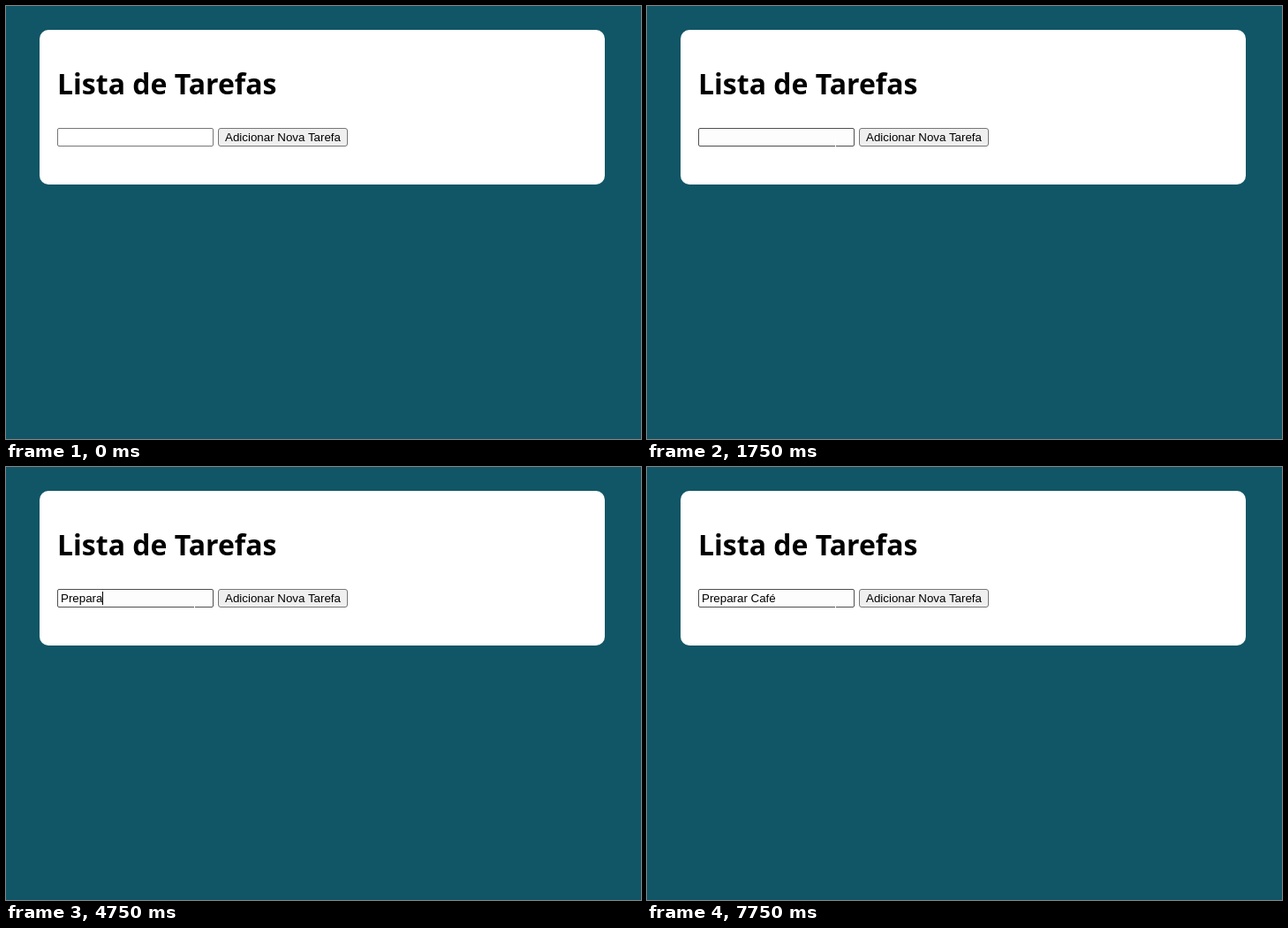
Write an HTML page that moves like this. It is 719 px wide and 490 px high and loops after 8 s.

```html
<!DOCTYPE html>
<html lang="pt-BR">
<head>
<meta charset="utf-8">
<title>Lista de Tarefas</title>
<style>
  html, body { margin: 0; width: 100%; height: 100%; overflow: hidden; background: rgb(17, 86, 102); }
  body * { position: absolute; box-sizing: border-box; margin: 0; white-space: pre; }
  .card { left: 38px; top: 27px; width: 640px; height: 175px; border-radius: 10px; background: #fff; }
  h1 { left: 58px; top: 66px; font: 700 32px/44px "Open Sans", sans-serif; color: #000; }
  .field, .button {
    top: 138px; height: 21px; border: 1px solid #767676; border-radius: 2px;
    font: 13.3333px/15px "Liberation Sans", Arial, sans-serif; color: #000;
  }
  .field { left: 58px; width: 177px; background: #fff; }
  .field.hover { border-color: #4f4f4f; background: #fdfdfd; }
  .field.pressed { border-color: #858585; }
  .text { left: 3px; top: 2px; }
  .caret { top: 2px; width: 1px; height: 15px; background: #000; }
  .button { left: 240px; width: 147px; border-radius: 3px; background: #efefef; text-align: center; padding-top: 2px; }
  .beam { left: 213px; top: 150px; width: 1px; height: 10px; background: #fff; }
  .arrow { left: 0; top: 0; width: 12px; height: 19px; overflow: visible; }
</style>
</head>
<body>
<div class="card"></div>
<h1>Lista de Tarefas</h1>
<div class="field"><span class="text"></span><i class="caret"></i></div>
<div class="button">Adicionar Nova Tarefa</div>
<div class="beam"></div>
<svg class="arrow" viewBox="0 0 12 19">
  <path d="M.5 .5V16.5L4.2 13L6.6 18.5L9 17.5L6.7 12H11.5Z" fill="#fff" stroke="#000"/>
</svg>
<script>
  const LOOP = 8000;
  const PHRASE = "Preparar Café";
  // Time at which each letter of the phrase appears
  const KEYS = [3000, 3500, 3750, 4000, 4250, 4500, 4750, 5000, 5500, 6000, 6250, 6750, 7250];
  const FOCUS = 1250;
  const BLINK = 500;

  const [field, text, caret, beam, arrow] =
    ["field", "text", "caret", "beam", "arrow"].map(name => document.querySelector("." + name));
  const show = (el, on) => { el.style.visibility = on ? "visible" : "hidden"; };

  function render(t) {
    const typed = KEYS.filter(key => key <= t).length;
    const lastInput = typed ? KEYS[typed - 1] : FOCUS;
    text.textContent = PHRASE.slice(0, typed);
    caret.style.left = 3 + Math.floor(text.getBoundingClientRect().width) + "px";
    show(caret, t >= FOCUS && Math.floor((t - lastInput) / BLINK) % 2 === 0);

    const pressed = t >= FOCUS && t < 1500;
    field.classList.toggle("pressed", pressed);
    field.classList.toggle("hover", t >= 750 && !pressed);

    show(arrow, t >= 250 && t < 750);
    arrow.style.transform = t < 500 ? "translate(243px, 183px)" : "translate(210px, 166px)";
    show(beam, t >= 750);
    beam.style.left = t < 1000 ? "216px" : "213px";
  }

  function tick() {
    render(performance.now() % LOOP);
    requestAnimationFrame(tick);
  }
  tick();
</script>
</body>
</html>
```
